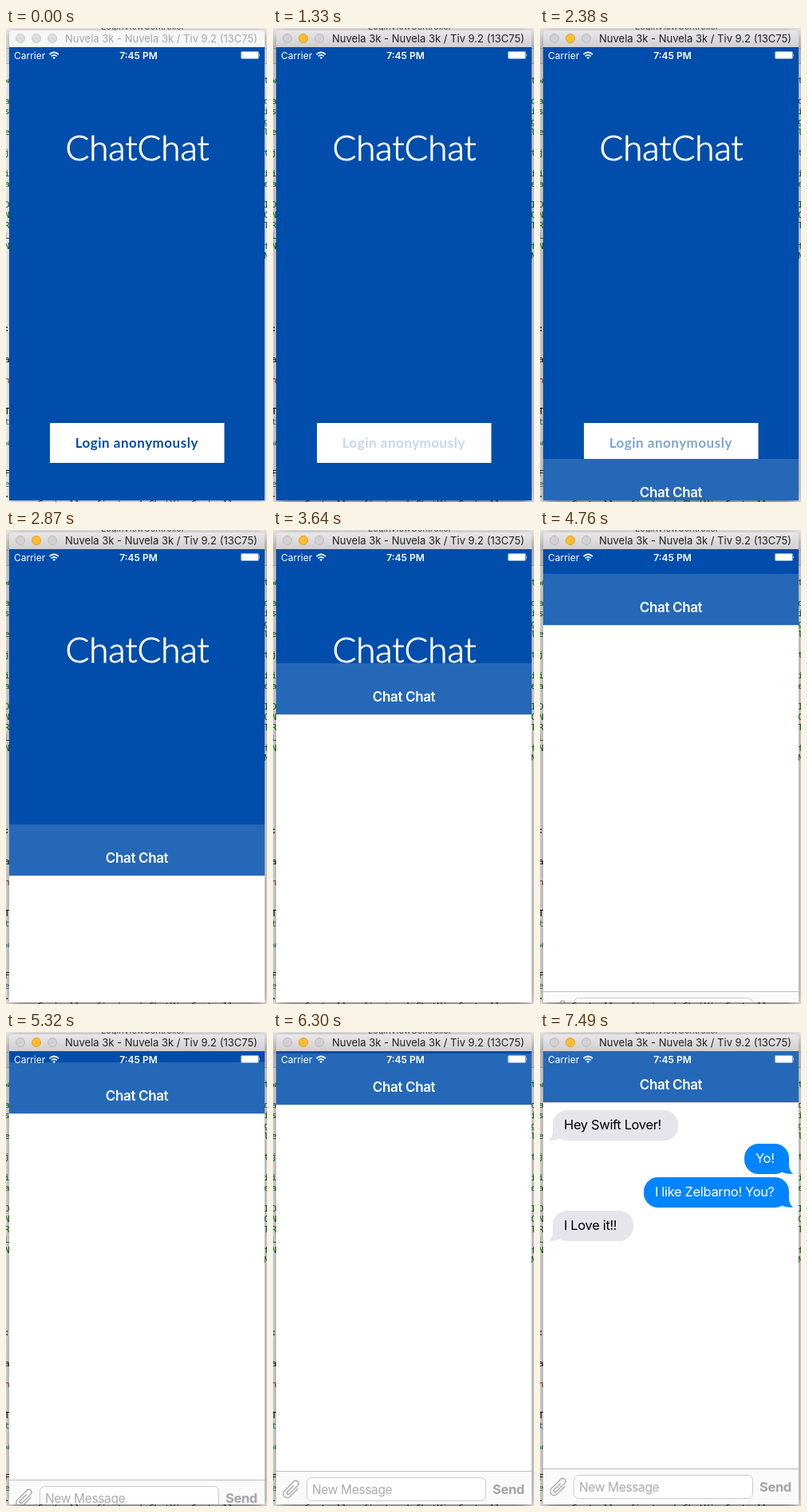
These frames come from a looping animation (327 by 594 pixels, 8 s). An HTML page:

```html
<!DOCTYPE html>
<html lang="en">
<head>
<meta charset="utf-8">
<title>Chat login</title>
<style>
  html, body { margin: 0; width: 100%; height: 100%; overflow: hidden; background: #fff; }
  svg { display: block; width: 327px; height: 594px; font-family: Inter, Roboto, sans-serif; }
  .code { font: 11px "DejaVu Sans Mono", monospace; white-space: pre; }
  .brand { font-family: Lato, "Open Sans", sans-serif; text-anchor: middle; }
  .ui { letter-spacing: -.35px; }
  .mid { text-anchor: middle; }
  #frame { filter: drop-shadow(0 2px 4px rgba(0,0,0,.4)); }
  #bar { fill: #f6f6f6; }
  #title { fill: #a8a8a8; }
  .dot { fill: #dcdcdc; stroke: #c9c9c9; }
  .active #frame { filter: drop-shadow(0 6px 9px rgba(0,0,0,.6)); }
  .active #bar { fill: url(#chrome); }
  .active #title { fill: #222; }
  .active .dot { fill: #d2d0d2; stroke: #bcbabc; }
  .active #minimize { fill: #fdbd2f; stroke: #e0a024; }
</style>
</head>
<body>
<svg id="stage" viewBox="0 0 327 594">
  <defs>
    <linearGradient id="chrome" x2="0" y2="1">
      <stop stop-color="#e9e7e9"/><stop offset="1" stop-color="#d0ced0"/>
    </linearGradient>
    <clipPath id="screen"><path d="M4 24h320v568H4z"/></clipPath>
  </defs>

  <!-- editor behind the window -->
  <path fill="#ececec" d="M0 0h327v44H0z"/>
  <path stroke="#c4c4c4" d="M0 25.5h327M0 44.5h327"/>
  <text x="119" y="2" font-size="11" fill="#555">LoginViewController</text>
  <text class="code" x="20" y="600" fill="#333">navController.first as! ChatViewController</text>
  <g id="code" class="code"></g>

  <!-- window -->
  <path id="frame" fill="#ddd" d="M4 592V7q0-4 4-4h312q4 0 4 4v585z"/>
  <path id="bar" d="M4 24V7q0-4 4-4h312q4 0 4 4v17z"/>
  <circle class="dot" cx="18" cy="13" r="5.5"/>
  <circle class="dot" id="minimize" cx="38" cy="13" r="5.5"/>
  <circle class="dot" cx="58" cy="13" r="5.5"/>
  <text id="title" class="mid" x="194.5" y="18" font-size="13">Nuvela 3k - Nuvela 3k / Tiv 9.2 (13C75)</text>

  <g clip-path="url(#screen)">
    <path fill="#004dab" d="M4 24h320v568H4z"/>
    <text class="brand" x="164.5" y="166" font-size="44" font-weight="300" fill="#fff" stroke="#fff" stroke-width=".9">ChatChat</text>
    <path fill="#fff" d="M55 495h218.500v50H55z"/>
    <text id="login" class="brand" x="163.800" y="525.500" font-size="17" font-weight="700" letter-spacing=".5" fill="#004dab">Login anonymously</text>

    <g id="chat" class="ui">
      <path fill="#fff" d="M4 0h320v568H4z"/>
      <path fill="#2568b7" d="M4 0h320v64H4z"/>
      <path fill="#000" opacity=".15" d="M4 64h320v1H4z"/>
      <text class="mid" x="164" y="48" font-size="17" font-weight="600" fill="#fff">Chat Chat</text>
      <g id="messages" font-size="16.5"></g>
      <path fill="#fafafa" d="M4 523h320v45H4z"/>
      <path fill="#bdbdbd" d="M4 523h320v1H4z"/>
      <path transform="translate(23.5 546) rotate(45)" fill="none" stroke="#a2a2a6" stroke-width="1.2"
        d="M5-6V8a5 5 0 0 1-10 0V-8.500a3.500 3.500 0 0 1 7 0V6.500a1.800 1.800 0 0 1-3.600 0V-5"/>
      <rect x="42.5" y="531.5" width="224" height="29" rx="6" fill="#fff" stroke="#cbcbcd"/>
      <text x="49" y="552" font-size="15.5" fill="#aaa">New Message</text>
      <text x="275" y="552" font-size="16.5" font-weight="700" fill="#a5a5a8">Send</text>
    </g>
  </g>

  <!-- status bar -->
  <g fill="#fff" font-size="12">
    <text x="10" y="38.500">Carrier</text>
    <g fill="none" stroke="#fff" stroke-width="1.7">
      <path d="M54.500 33q5.700-5 11.400 0M56.700 35.300q3.500-3 7 0"/>
    </g>
    <path d="M58.300 37q1.900-1.500 3.800 0l-1.900 2z"/>
    <text class="mid" x="166" y="38.500" font-weight="600">7:45 PM</text>
    <rect x="294.250" y="29.500" width="22.500" height="9" rx="1.500" fill="none" stroke="#fff" stroke-width=".5"/>
    <rect x="295" y="30" width="21" height="8" rx="1"/>
    <path d="M317.500 32q1.500 2 0 4z"/>
  </g>
</svg>

<script>
const $ = id => document.getElementById(id);

// Editor letters that stick out at either side, one per line
const left = "w as e j ia DNRLN       :  a h  Tt w  Fe.";
const right = "t digl t ie ICT fN";
const ink = (ch, row) => row < 18 ? "#007400" : ch === "h" ? "#b02020" : "twe".includes(ch) ? "#2e8088" : "#000";
const letters = (text, x, anchor) => [...text].map((ch, row) =>
  `<text x="${x}" y="${69 + row * 12.97}" text-anchor="${anchor}" fill="${ink(ch, row)}">${ch}</text>`).join("");
$("code").innerHTML = letters(left, 4.5, "end") + letters(right, 323, "start");

function bubble(y, width, text, mine) {
  const x = mine ? 312 - width : 16;
  const tail = "M16 20Q17 35 10.500 37.500Q19 39 27 34z";
  const flip = mine ? "translate(328) scale(-1 1)" : "";
  return `<g transform="translate(0 ${y})" fill="${mine ? "#0084ff" : "#e6e5eb"}">
    <rect x="${x}" width="${width}" height="38" rx="18"/>
    <path transform="${flip}" d="${tail}"/>
    <text x="${x + 14}" y="24" fill="${mine ? "#fff" : "#000"}">${text}</text></g>`;
}
$("messages").innerHTML =
  bubble(74, 157, "Hey Swift Lover!") +
  bubble(116, 56, "Yo!", true) +
  bubble(158, 182, "I like Zelbarno! You?", true) +
  bubble(200, 101, "I Love it!!");

// Critically damped spring: 1 at the start, settling to 0
function spring(ms) {
  const s = 1.73 * Math.max(0, ms) / 1000;
  return (1 + s) * Math.exp(-s);
}

function draw() {
  const t = Math.floor(performance.now() % 8000 / 70) * 70;
  const active = t >= 1190;
  $("stage").classList.toggle("active", active);
  // Pressed label dims at once, then slowly recovers
  const recover = Math.max(0, t - 1260) / 1120;
  $("login").setAttribute("opacity", active ? Math.min(1, .2 + .3 * recover) : 1);
  const top = 24 + Math.floor(568 * spring(t - 2088) + .4);
  $("chat").setAttribute("transform", `translate(0 ${top})`);
  $("messages").setAttribute("visibility", t >= 7490 ? "visible" : "hidden");
  requestAnimationFrame(draw);
}
draw();
</script>
</body>
</html>
```
